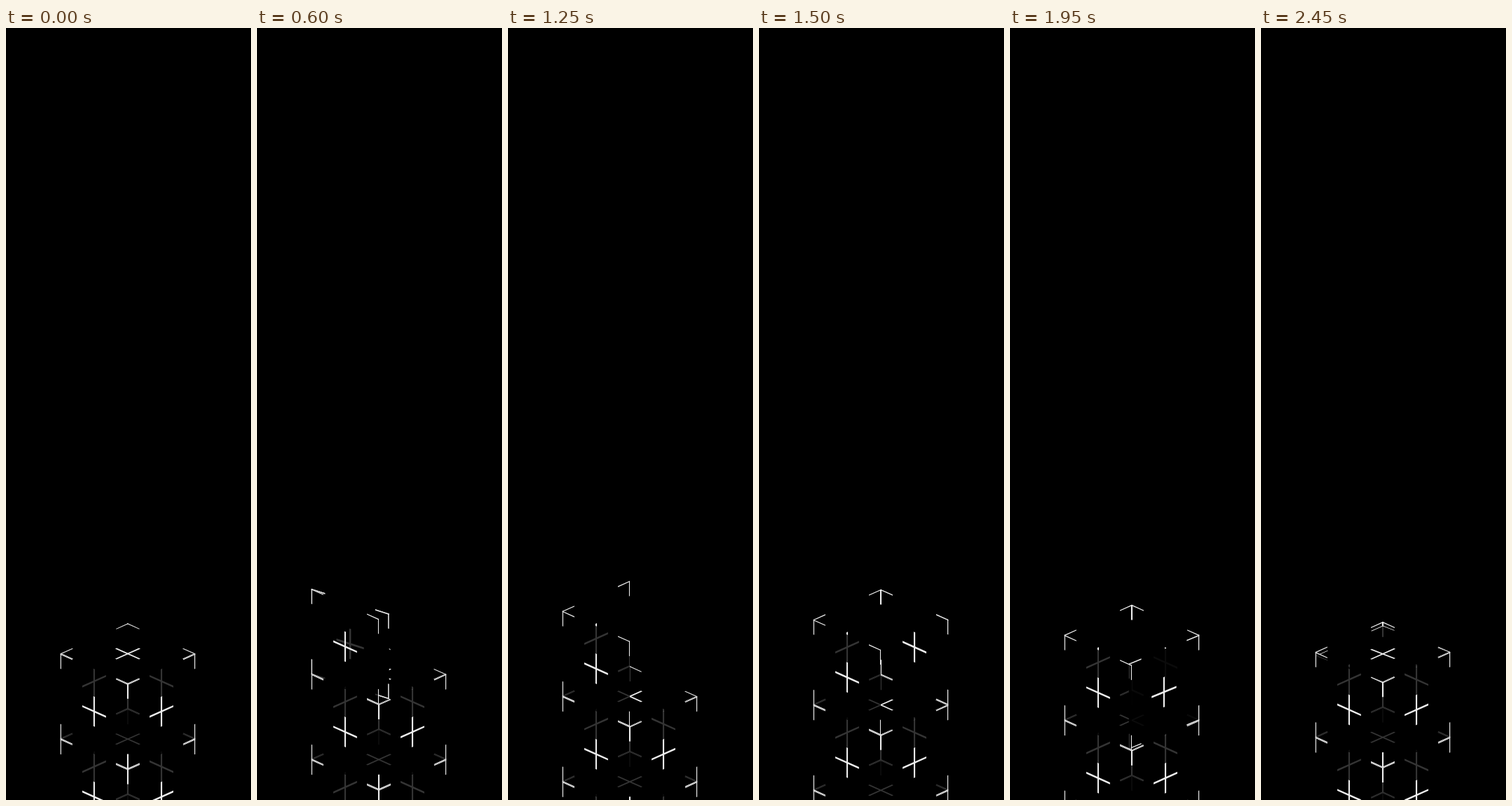
An HTML page with a canvas that plays this animation: 350 by 1100 pixels, repeating every 2500 ms.

```html
<!DOCTYPE html>
<html lang="en">
<head>
<meta charset="utf-8">
<title>Folding cube tower</title>
<style>
  html, body { margin: 0; width: 100%; height: 100%; overflow: hidden; background: #000; }
  canvas { display: block; }
</style>
</head>
<body>
<canvas id="stage" width="350" height="1100"></canvas>
<script>
const ctx = document.getElementById('stage').getContext('2d');
const LOOP = 2500, STEP = 50, FOLDS = 5;
const SIDE = 136, TICK = 24, HALF = 1.5;
const CENTER_X = 174, BASE_Y = 891.55;
const LINE = '#eee', PANE = 'rgba(0,0,0,0.78)';

// Screen directions of the cube's three edges.
const A = [96.17, 43], B = [96.17, -43], UP = [0, -121.64];
const RISE = 121.64;

const add = (p, q) => [p[0] + q[0], p[1] + q[1]];
const neg = p => [-p[0], -p[1]];
const turn = (from, to, angle) => {
  const c = Math.cos(angle), s = Math.sin(angle);
  return [from[0] * c + to[0] * s, from[1] * c + to[1] * s];
};

function foldAngle(t, index) {
  const p = Math.min(1, Math.max(0, t / (LOOP / FOLDS) - index));
  return p * p * (3 - 2 * p) * Math.PI / 2;
}

// One translucent square with corner ticks and a centre cross.
function drawPane([o, u, v]) {
  ctx.setTransform(u[0] / SIDE, u[1] / SIDE, v[0] / SIDE, v[1] / SIDE, o[0], o[1]);
  ctx.fillStyle = PANE;
  ctx.fillRect(0, 0, SIDE, SIDE);
  ctx.fillStyle = LINE;
  for (const far of [0, SIDE - HALF]) {
    for (const start of [0, SIDE - TICK]) {
      ctx.fillRect(start, far, TICK, HALF);
      ctx.fillRect(far, start, HALF, TICK);
    }
  }
  const mid = SIDE / 2;
  ctx.fillRect(mid - TICK, mid - HALF, TICK * 2, HALF * 2);
  ctx.fillRect(mid - HALF, mid - TICK, HALF * 2, TICK * 2);
}

// Five panes hinged in a chain: four walls, then the lid.
function drawCube(y, t) {
  const angle = i => foldAngle(t, i);
  const left = [CENTER_X - A[0], y];
  const v = turn(B, UP, angle(0));
  const u2 = turn(A, B, angle(1));
  const back = add(left, u2);
  const u3 = turn(neg(u2), A, angle(2));
  const right = add(back, u3);
  const u4 = turn(neg(u3), neg(B), angle(3));
  const lid = turn(neg(v), neg(A), angle(4));
  [
    [left, u2, v],
    [back, u3, v],
    [add(right, v), u4, lid],
    [right, u4, v],
    [left, A, v]
  ].forEach(drawPane);
}

function draw(t) {
  ctx.setTransform(1, 0, 0, 1, 0, 0);
  ctx.fillStyle = '#000';
  ctx.fillRect(0, 0, 350, 1100);
  const y = BASE_Y + RISE * t / LOOP;
  for (let k = 4; k > 0; k--) drawCube(y + k * RISE, LOOP);
  drawCube(y, t);
}

const begin = performance.now();
function tick() {
  const t = (performance.now() - begin) % LOOP;
  draw(Math.floor(t / STEP) * STEP);
  requestAnimationFrame(tick);
}
tick();
</script>
</body>
</html>
```
